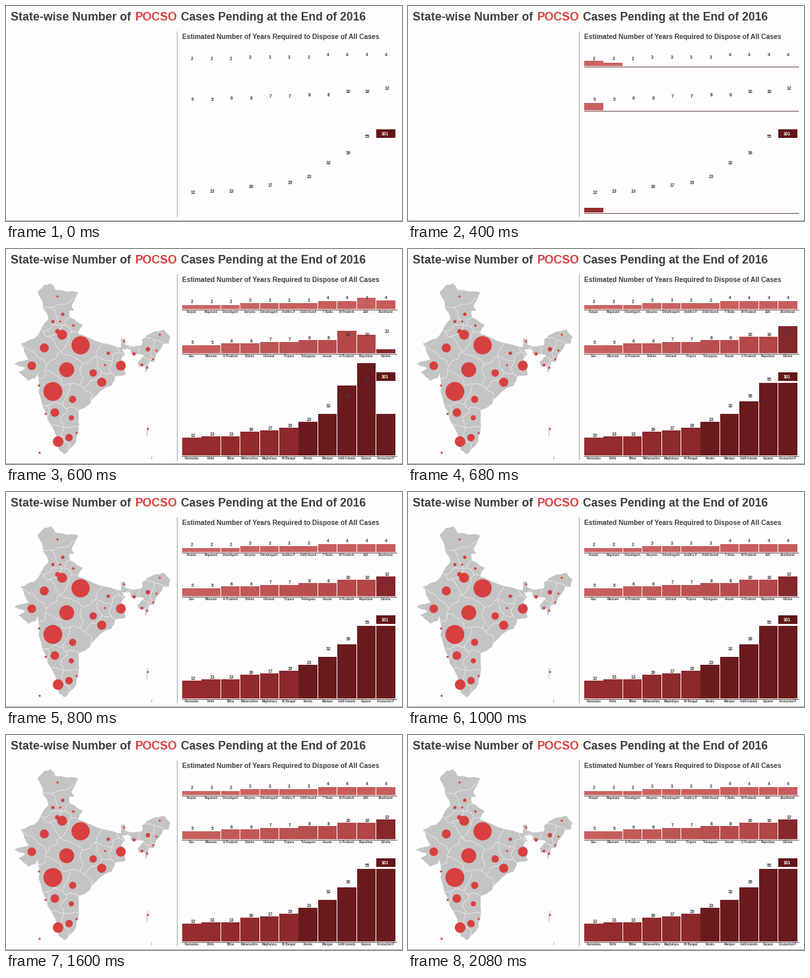
A matplotlib script that plays this animation: 600x326 px, repeating every 2120 ms.

```python
import math
import numpy as np
import matplotlib.pyplot as plt
from matplotlib.animation import FuncAnimation
from matplotlib.collections import LineCollection
from matplotlib.colors import to_rgb
from matplotlib.patches import Circle, Polygon, Rectangle

W, H, DPI = 600, 326, 64
FRAMES, STEP = 53, 40
INK, RED, LAND, PAPER = "#3d3d3f", "#d8403f", "#c4c4c4", "#fdfdfd"

plt.rcParams["font.family"] = "Liberation Sans"
fig = plt.figure(figsize=(W / DPI, H / DPI), dpi=DPI, facecolor=PAPER)
ax = fig.add_axes([0, 0, 1, 1])
ax.axis("off")
rng = np.random.default_rng(4)


def write(x, y, s, px, color=INK, ha="left"):
    return ax.text(x, y, s, fontsize=px * 72 / DPI, color=color, ha=ha,
                   va="baseline", weight="bold", zorder=6)


def rule(x, y, color, width=1, z=5):
    return ax.plot(x, y, color=color, lw=width * 72 / DPI, zorder=z,
                   solid_capstyle="butt")[0]


# Heading and frame lines
write(7, 22, "State-wise Number of", 17.7)
write(196, 22, "POCSO", 17.6, RED)
write(265, 22, "Cases Pending at the End of 2016", 17.5)
write(267, 50, "Estimated Number of Years Required to Dispose of All Cases", 10.2)
rule([258.5, 258.5], [38, 320], "#a3a3a3")
rule([0, W], [325.3, 325.3], "#a8a8a8")


# Map outline in degrees of longitude and latitude
def project(pts):
    lon, lat = np.array(pts, float).T
    scale = np.where(lat > 28.6, 9.3, 8.85)
    return np.column_stack([11 + (lon - 68.1) * 8.16, 130 - (lat - 28.6) * scale])


def roughen(xy, amount=0.1, rounds=2):
    """Midpoint displacement that makes straight runs look natural."""
    for _ in range(rounds):
        a, b = xy[:-1], xy[1:]
        d = b - a
        normal = np.column_stack([-d[:, 1], d[:, 0]])
        mid = (a + b) / 2 + normal * rng.uniform(-amount, amount, (len(a), 1))
        out = np.empty((len(a) * 2 + 1, 2))
        out[::2], out[1::2] = xy, mid
        xy = out
    return xy


inland = [(73.6, 33), (72.6, 35.5), (73.8, 36.7), (75.1, 37), (76, 35.9),
          (80.2, 35.5), (78.9, 33.3), (79.4, 32.6), (78.5, 32.5), (78.7, 31.4),
          (81, 30.2), (80.1, 28.8), (84.2, 27.3), (88.1, 26.4), (88.1, 27.9),
          (88.8, 28), (88.9, 26.9), (92, 26.8), (92, 27.8), (94, 29),
          (96.2, 29.4), (97.3, 28.2), (97, 27.1), (95.9, 27), (94.6, 25.2),
          (94.2, 23.9), (93.4, 24), (92.8, 22), (92.1, 23.7), (91.6, 23),
          (91.2, 23.9), (92.4, 25.1), (89.9, 25.3), (89.8, 26.1), (88.3, 26.1),
          (88.9, 25.2), (88.1, 24.4), (88.7, 24)]
coast = [(89, 21.8), (87, 21.4), (86.4, 19.9), (85.2, 19.5), (82.3, 16.7),
         (80.2, 15.6), (80.3, 13.3), (79.8, 10.3), (78.9, 9.3), (77.5, 8.1),
         (76.6, 8.8), (74.5, 14), (72.8, 18.8), (72.6, 22.2), (72.2, 21.2),
         (70.9, 20.7), (69, 22.2), (70.3, 22.9), (68.3, 23.6), (71, 24.4),
         (70.1, 25.7), (69.5, 27.1), (71.9, 27.9), (74.6, 31.1), (73.6, 33)]

bubbles = [
    (86, 99, 2.6), (71, 110, 2.4), (102, 116, 1.9), (78, 125, 3.6), (85, 130, 7.5),
    (58, 150, 6.8), (113, 146, 13.8), (155, 158, 2.6), (194, 159, 2.6),
    (215, 152, 3.4), (206, 176, 2.2), (174, 177, 7.4), (132, 188, 5.6),
    (145, 202, 6.9), (39, 177, 6.5), (92, 183, 11.3), (71, 216, 14.3),
    (101, 228, 5.4), (74, 248, 6.5), (99, 256, 3.9), (95.5, 286, 5.6), (79, 292, 8)]
dots = [(78, 72), (179, 140), (233, 130), (228, 154), (214, 180), (150, 176),
        (60, 250), (82, 110), (223, 167), (50, 207), (107, 279), (51, 309), (215, 273)]
bubbles += [(x, y, 1.6) for x, y in dots]
states = bubbles[:-6]


def state_borders():
    """Edges between the regions nearest to each state's bubble."""
    gx, gy = np.meshgrid(np.arange(8, 256), np.arange(40, 318))
    wx = gx + 2 * np.sin(gy / 4) + 1.5 * np.sin(gx / 3 + gy / 7)
    wy = gy + 2 * np.sin(gx / 5) + 1.5 * np.sin(gy / 3 - gx / 6)
    dist = np.array([np.hypot(wx - x, wy - y) - 0.9 * r for x, y, r in states])
    lines = []
    for i in range(len(states)):
        gap = dist[i] - np.delete(dist, i, 0).min(0)
        edge = ax.contour(gx, gy, gap, levels=[0])
        lines += edge.allsegs[0]
        edge.remove()
    return lines


land = Polygon(roughen(project(inland + coast)), fc=LAND, ec="none", zorder=1)
seams = LineCollection(state_borders(), colors="#f2f2f2",
                       linewidths=0.45 * 72 / DPI, zorder=2)
fading = [ax.add_patch(land), ax.add_collection(seams)]
seams.set_clip_path(land)
for x, y, h in [(215, 267, 6), (214, 275, 9), (221, 314, 5)]:
    fading.append(rule([x, x - 0.6], [y, y + h], LAND, 1.4, z=1))
for x, y, r in bubbles:
    fading.append(ax.add_patch(Circle((x, y), r, fc=RED, ec="none", zorder=3)))

# Bar rows
LEFT, PITCH, BAR = 267, 29.4, 28.6


def row_colors(first, last, special, n):
    """Gradient over the first n bars, then one darker tone."""
    a, b = np.array(to_rgb(first)), np.array(to_rgb(last))
    return [a + (b - a) * i / (n - 1) if i < n else special for i in range(11)]


def tall_bar(v):
    return np.interp(v, [12, 23, 32, 39, 55], [27, 51, 63, 82, 110])


def tall_label(v):
    return np.interp(v, [12, 16, 23, 32, 39, 55], [30.5, 39, 54.5, 75, 90.5, 115])


rows = [
    dict(base=91, start=1.9, late=11.3, text_x=282,
         names="Punjab,Nagaland,Chandigarh,Haryana,Chhattisgarh,Andhra P,D&N Haveli,"
               "T Nadu,M Pradesh,J&K,Jharkhand",
         values=[2, 2, 2, 3, 3, 3, 3, 4, 4, 4, 4],
         height=lambda v: 3 * v, label=lambda v: 3 * v + 5,
         colors=row_colors("#cb6464", "#c65c5c", "#c65c5c", 11)),
    dict(base=158, start=0.9, late=11.3, text_x=283,
         names="Goa,Mizoram,H Pradesh,Sikkim,U'khand,Tripura,Telangana,Assam,"
               "U Pradesh,Rajasthan,Odisha",
         values=[5, 5, 6, 6, 7, 7, 8, 8, 10, 10, 12],
         height=lambda v: 2.5 * v, label=lambda v: 2.5 * v + 3.8,
         colors=row_colors("#c86060", "#b24546", "#84282b", 10)),
    dict(base=313, start=0.27, late=13.3, text_x=283,
         names="Karnataka,Delhi,Bihar,Maharashtra,Meghalaya,W Bengal,Kerala,Manipur,"
               "A&N Islands,Gujarat,Arunachal P",
         values=[12, 13, 13, 16, 17, 19, 23, 32, 39, 55, 101],
         height=tall_bar, label=tall_label,
         colors=row_colors("#962c2f", "#8c282b", "#6a1a1d", 6)),
]

for row in rows:
    base = row["base"]
    row["axis"] = rule([266, 266], [base + 0.5] * 2, "#6b4a4a")
    row["bars"] = []
    for i, (name, v) in enumerate(zip(row["names"].split(","), row["values"])):
        x = LEFT + PITCH * i
        bar = Rectangle((x, base), BAR, 0, fc=row["colors"][i], ec="none", zorder=4)
        row["bars"].append(ax.add_patch(bar))
        fading.append(write(x + BAR / 2, base + 5.6, name, 4.5, ha="center"))
        if v < 100:
            y = base - row["label"](v) + 2.5
            write(row["text_x"] + PITCH * i, y, str(v), 6.8, ha="center")

ax.add_patch(Rectangle((561, 186.5), 29, 13.5, fc="#631517", ec="none", zorder=5))
write(574, 195.6, "101", 6.6, "white", "center")
ax.set_xlim(0, W)
ax.set_ylim(H, 0)


def spring(x, over):
    """Linear rise, one overshoot, then rest."""
    if x < 1:
        return max(x, 0)
    if x < 3.2:
        return 1 + over * math.sin(math.pi * (x - 1) / 2.2)
    return 1


def draw(k):
    alpha = float(np.interp(k, [10, 13], [0, 1]))
    for artist in fading:
        artist.set_alpha(alpha)
    grow = 1 - (1 - np.clip((k - 2) / 7, 0, 1)) ** 2
    for row in rows:
        row["axis"].set_xdata([266, 266 + 326 * grow])
        s, late = row["start"], row["late"]
        wave = np.interp(k, [9, 10, 13, 17, 21],
                         [s - 2.4, s, s + 7.3, s + late, s + late + 4])
        for i, (bar, v) in enumerate(zip(row["bars"], row["values"])):
            over = 0.01 if v > 100 else 0.38
            bar.set_height(-row["height"](v) * spring(wave - i, over))
    return []


anim = FuncAnimation(fig, draw, frames=FRAMES, interval=STEP, repeat=True,
                     repeat_delay=0, init_func=lambda: draw(0))
plt.show()
```
